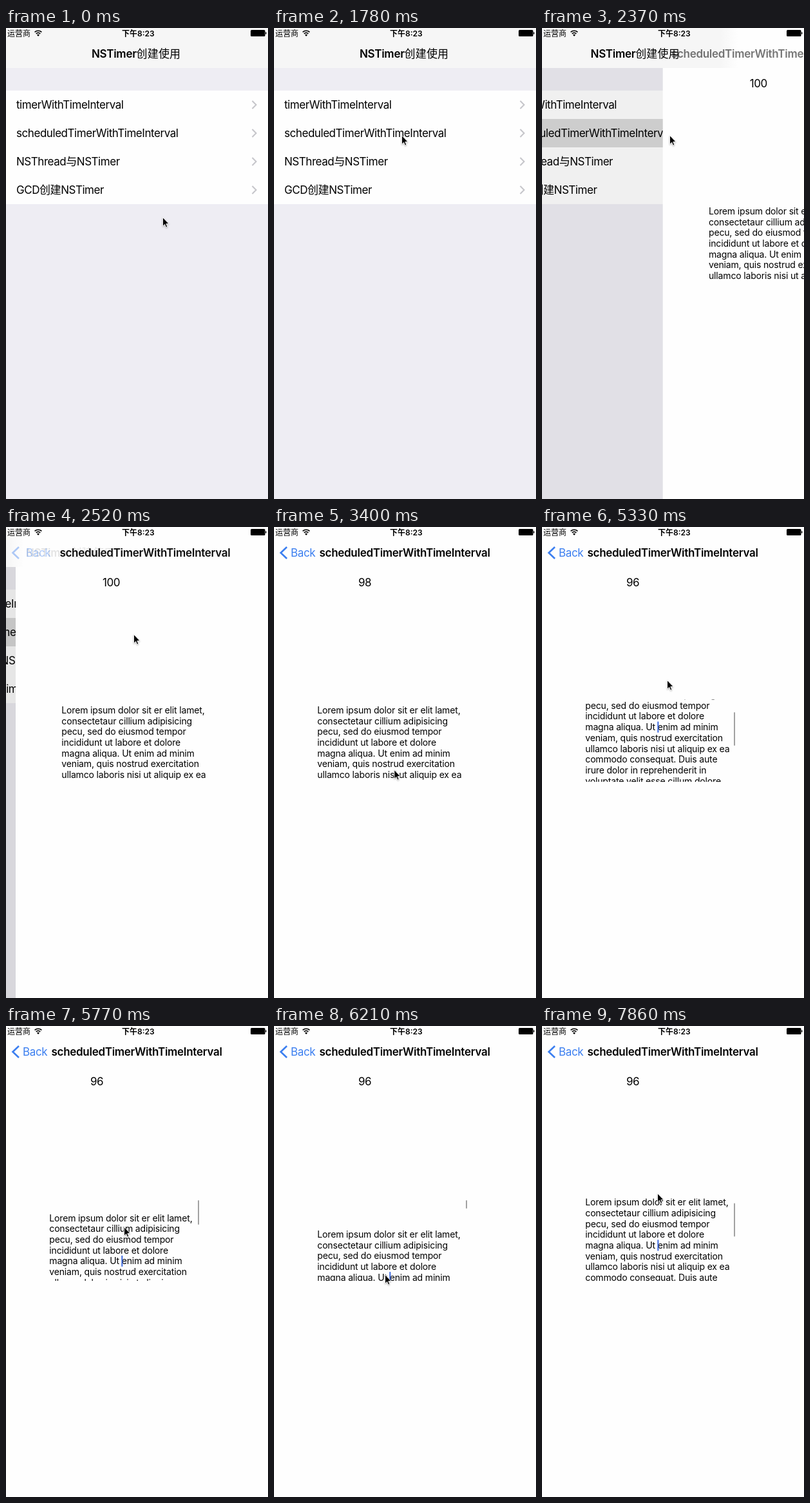
Write an HTML page that moves like this. It is 407x730 px and loops after 8 s.

```html
<!DOCTYPE html>
<html lang="zh-CN">
<head>
<meta charset="utf-8">
<title>Timer demo</title>
<style>
  html, body { margin: 0; width: 100%; height: 100%; overflow: hidden; background: #fefefe; }
  svg { display: block; width: 407px; height: 730px; }
  text {
    font: 400 17px Inter, "Noto Sans CJK SC", "Noto Sans CJK", sans-serif;
    font-optical-sizing: none;
    letter-spacing: -.026em;
    white-space: pre;
  }
  .title { font-weight: 600; letter-spacing: -.017em; }
  .title tspan { font-weight: 500; letter-spacing: .008em; }
  .body text { font-size: 14px; letter-spacing: -.0113em; }
  .status text { font-size: 12px; letter-spacing: 0; }
  .status .clock { font-weight: 600; }
  .back text { fill: #3c7ff0; letter-spacing: -.02em; }
  .line { fill: none; }
  #cursor { filter: drop-shadow(0 1px 1px rgba(0, 0, 0, .3)); }
</style>
</head>
<body>
<svg viewBox="0 0 407 730">
  <defs>
    <clipPath id="view"><rect x="60" y="267.5" width="245" height="127.5"/></clipPath>
    <linearGradient id="veil" gradientUnits="userSpaceOnUse" x1="0" x2="28" y1="0" y2="0">
      <stop offset="0" stop-color="#fefefe" stop-opacity="0"/>
      <stop offset="1" stop-color="#fefefe"/>
    </linearGradient>
  </defs>

  <g id="menu">
    <rect x="-4" width="414" height="730" fill="#eeedf3"/>
    <rect x="-4" y="97" width="414" height="176" fill="#fefefe"/>
    <rect id="pressed" x="-4" y="141" width="414" height="44" fill="#d9d9d9"/>
    <g id="rows"></g>
  </g>
  <rect id="dim" width="407" height="730"/>

  <g id="detail">
    <rect x="-4" width="420" height="730" fill="#fefefe"/>
    <text id="count" x="131" y="92"></text>
    <g clip-path="url(#view)">
      <g id="scroll" class="body">
        <g id="lines"></g>
        <rect id="caret" x="179.3" y="342" width="2" height="17" fill="#3f6be0"/>
      </g>
    </g>
    <rect id="bar" x="298" width="2" rx="1" fill="#a2a2a2"/>
  </g>

  <rect width="407" height="62" fill="#f6f6f6"/>
  <rect id="navVeil" width="460" height="62" fill="url(#veil)"/>
  <text id="oldTitle" class="title" y="46">NSTimer<tspan>创建使用</tspan></text>
  <g id="back" class="back">
    <path class="line" d="M20 31L10.5 40L20 49" stroke="#3c7ff0" stroke-width="2.6"/>
    <text id="backText" x="26" y="46">Back</text>
  </g>
  <text id="newTitle" class="title" y="46">scheduledTimerWithTimeInterval</text>

  <g class="status">
    <text x="2" y="13">运营商</text>
    <path class="line" d="M44.6 6.4A8 8 0 0 1 55.4 6.4M46.7 8.8A5 5 0 0 1 53.3 8.8" stroke="#000" stroke-width="1.6"/>
    <path d="M50 13L48 10.6A3 3 0 0 1 52 10.6Z"/>
    <text class="clock" x="205.3" y="13" text-anchor="middle">下午8:23</text>
    <rect x="380" y="3" width="22.5" height="10" rx="1.5"/>
    <rect x="403" y="6.3" width="1.4" height="3.4" rx=".7"/>
  </g>

  <path id="cursor" d="M.5 .5V14.2L3.6 11.3L5.7 16.1L7.8 15.2L5.8 10.5H10Z" stroke="#fff" stroke-width=".9"/>
</svg>
<script>
const LOOP = 8000, STEP = 148, LAST = 53;
const PUSH = 15, TAP = 27, GRAB = 30;
const $ = id => document.getElementById(id);
const clamp = (v, lo, hi) => Math.min(hi, Math.max(lo, v));

const items = ['timerWithTimeInterval', 'scheduledTimerWithTimeInterval', 'NSThread与NSTimer', 'GCD创建NSTimer'];
$('rows').innerHTML = items.map((s, i) => {
  const y = 119 + 44 * i;
  return `<text x="16" y="${y + 6}">${s}</text>
    <path class="line" d="M382.5 ${y - 6}l6 6l-6 6" stroke="#c5c5ca" stroke-width="2"/>`;
}).join('');

const copy = `Lorem ipsum dolor sit er elit lamet,
consectetaur cillium adipisicing
pecu, sed do eiusmod tempor
incididunt ut labore et dolore
magna aliqua. Ut enim ad minim
veniam, quis nostrud exercitation
ullamco laboris nisi ut aliquip ex ea
commodo consequat. Duis aute
irure dolor in reprehenderit in
voluptate velit esse cillum dolore`;
$('lines').innerHTML = copy.split('\n')
  .map((s, i) => `<text x="67.3" y="${288.8 + 16.7 * i}">${s}</text>`).join('');

// Pointer strokes; it rests between them
const strokes = [
  { from: 0, to: 7, x: 188, y: 208 },
  { from: 10, to: 12, x: 198, y: 166 },
  { from: 18, to: 24, x: 184, y: 418 },
  { from: 24, to: GRAB, x: 188, y: 282 },
  { from: GRAB, to: 31, x: 188, y: 290 },
  { from: 31, to: 36, x: 194, y: 237 },
  { from: 36, to: 42, x: 172, y: 385 },
  { from: 51, to: 53, x: 179, y: 259 }
];

function pointer(n) {
  let x = 243, y = 293;
  for (const s of strokes) {
    const p = clamp((n - s.from) / (s.to - s.from), 0, 1);
    x += (s.x - x) * p;
    y += (s.y - y) * p;
  }
  return [x, y];
}

// The text trails the pointer a little and resists past its top
function scrollAt(n) {
  if (n < GRAB) return 0;
  const pull = pointer(n - .15)[1] - 279, size = 128;
  return pull < 0 ? pull : size * (1 - 1 / (pull * .55 / size + 1));
}

const move = (id, x, y = 0) => $(id).setAttribute('transform', `translate(${x} ${y})`);
const set = (id, name, value) => $(id).setAttribute(name, value);
const show = (id, opacity) => set(id, 'opacity', clamp(opacity, 0, 1));

function draw(time) {
  const n = Math.min(LAST, Math.floor((time % LOOP + 12) / STEP));
  const left = Math.exp(-.77 * Math.max(0, n - PUSH) ** 2);
  const sx = 414 * left, y = scrollAt(n);

  move('cursor', ...pointer(n));

  show('pressed', n >= PUSH);
  move('menu', -124 * (1 - left));
  show('dim', .1 * (1 - left));
  move('detail', sx);
  move('navVeil', sx * 1.6 - 30);

  set('oldTitle', 'x', 26 + 107 * left);
  show('oldTitle', sx / 190);
  show('back', 1 - sx / 32);
  move('backText', sx * .26);
  set('newTitle', 'x', 70.5 + sx * .68);
  show('newTitle', 1 - left);

  $('count').textContent = 100 - clamp(Math.floor((n - 15.4) / 3.6), 0, 4);
  move('scroll', 0, y);
  show('caret', n >= TAP);
  show('bar', n > GRAB);
  set('bar', 'y', 270 + Math.max(0, -y) * .42);
  set('bar', 'height', 52 - Math.max(0, y));
}

const start = performance.now();
function loop() {
  draw(performance.now() - start);
  requestAnimationFrame(loop);
}
loop();
</script>
</body>
</html>
```
